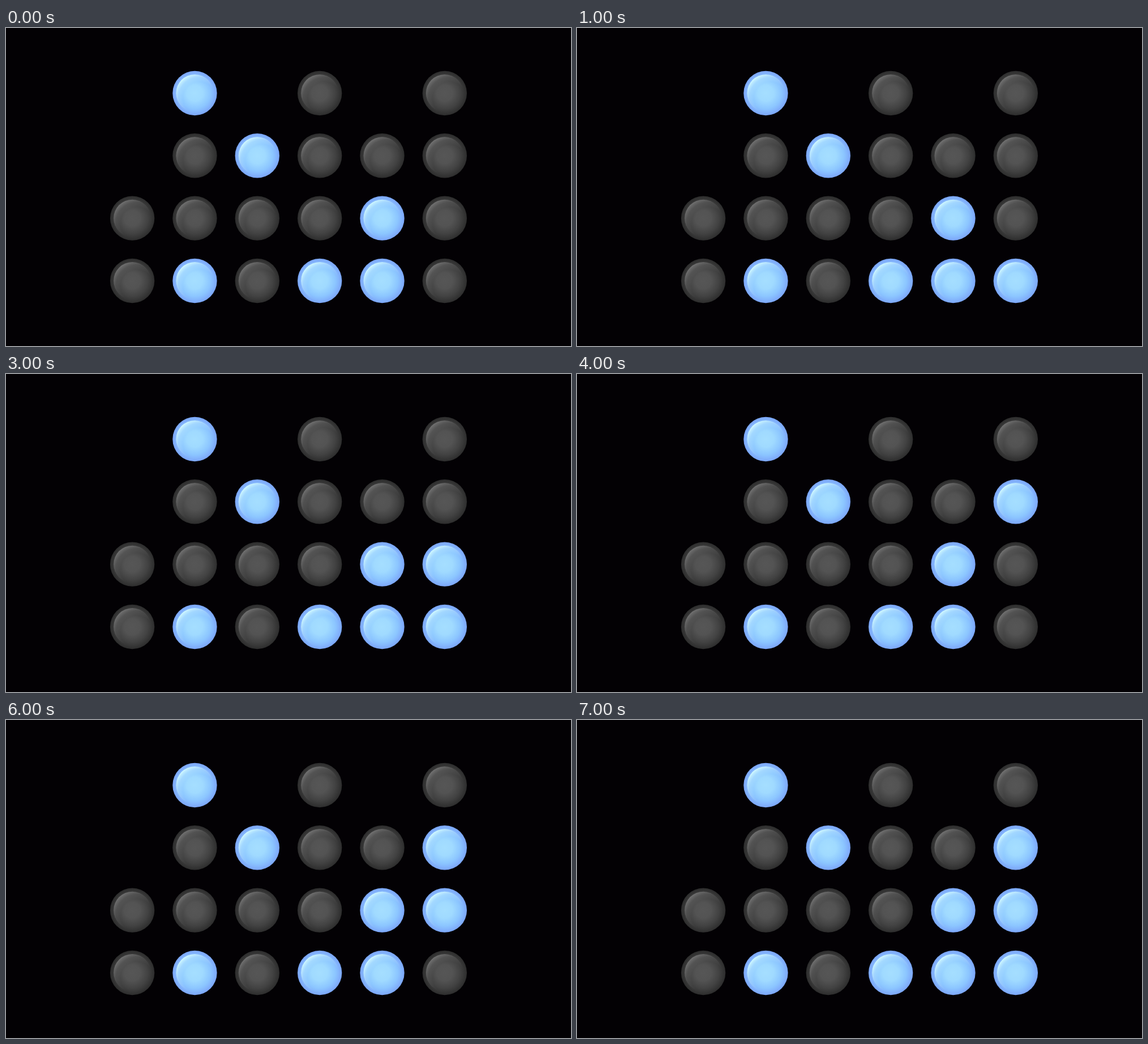
Write an HTML page with a canvas that moves like this. It is 998x561 px and loops after 8 s.

```html
<!DOCTYPE html>
<html lang="en">
<head>
<meta charset="utf-8">
<title>Binary clock</title>
<style>
  html, body { margin: 0; width: 100%; height: 100%; overflow: hidden; background: #030104; }
  canvas { display: block; }
</style>
</head>
<body>
<canvas id="stage" width="998" height="561"></canvas>
<script>
const ctx = document.getElementById('stage').getContext('2d');
const PITCH = 110.35, LEFT = 223.1, BOTTOM = 446, RADIUS = 39.2, GLOSS_RADIUS = 33;
const BITS = [2, 4, 3, 4, 3, 4];        // lamps per column
const START = [0, 9, 4, 1, 3, 0];       // 09:41:30

const ON = { body: ['#a5deff', '#a0daff', '#8cc6ff', '#7ca6fa'], gloss: '214,255,255', shine: 0.95 };
const OFF = { body: ['#565656', '#535353', '#424242', '#2d2d2d'], gloss: '150,150,150', shine: 0.62 };
const STOPS = [0, 0.36, 0.7, 1];

function disc(x, y, r, fill) {
  ctx.fillStyle = fill;
  ctx.beginPath();
  ctx.arc(x, y, r, 0, Math.PI * 2);
  ctx.fill();
}

function lamp(x, y, { body, gloss, shine }) {
  const base = ctx.createRadialGradient(x, y, 0, x, y, RADIUS);
  body.forEach((color, i) => base.addColorStop(STOPS[i], color));
  disc(x, y, RADIUS, base);

  // Crescent of light along the upper left
  const light = ctx.createRadialGradient(x + 8, y + 9, 29, x + 8, y + 9, 45);
  light.addColorStop(0, `rgba(${gloss},0)`);
  light.addColorStop(0.5, `rgba(${gloss},${shine * 0.3})`);
  light.addColorStop(1, `rgba(${gloss},${shine})`);
  ctx.save();
  ctx.beginPath();
  ctx.rect(x - RADIUS, y - RADIUS, RADIUS * 2, RADIUS * 2);
  ctx.clip();
  disc(x, y, GLOSS_RADIUS, light);
  ctx.restore();
}

function draw(now) {
  const digits = [...START];
  digits[5] = Math.floor(now / 1000) % 8;
  ctx.fillStyle = '#030104';
  ctx.fillRect(0, 0, 998, 561);
  digits.forEach((digit, col) => {
    for (let bit = 0; bit < BITS[col]; bit++) {
      lamp(LEFT + col * PITCH, BOTTOM - bit * PITCH, digit >> bit & 1 ? ON : OFF);
    }
  });
  requestAnimationFrame(draw);
}
requestAnimationFrame(draw);
</script>
</body>
</html>
```
